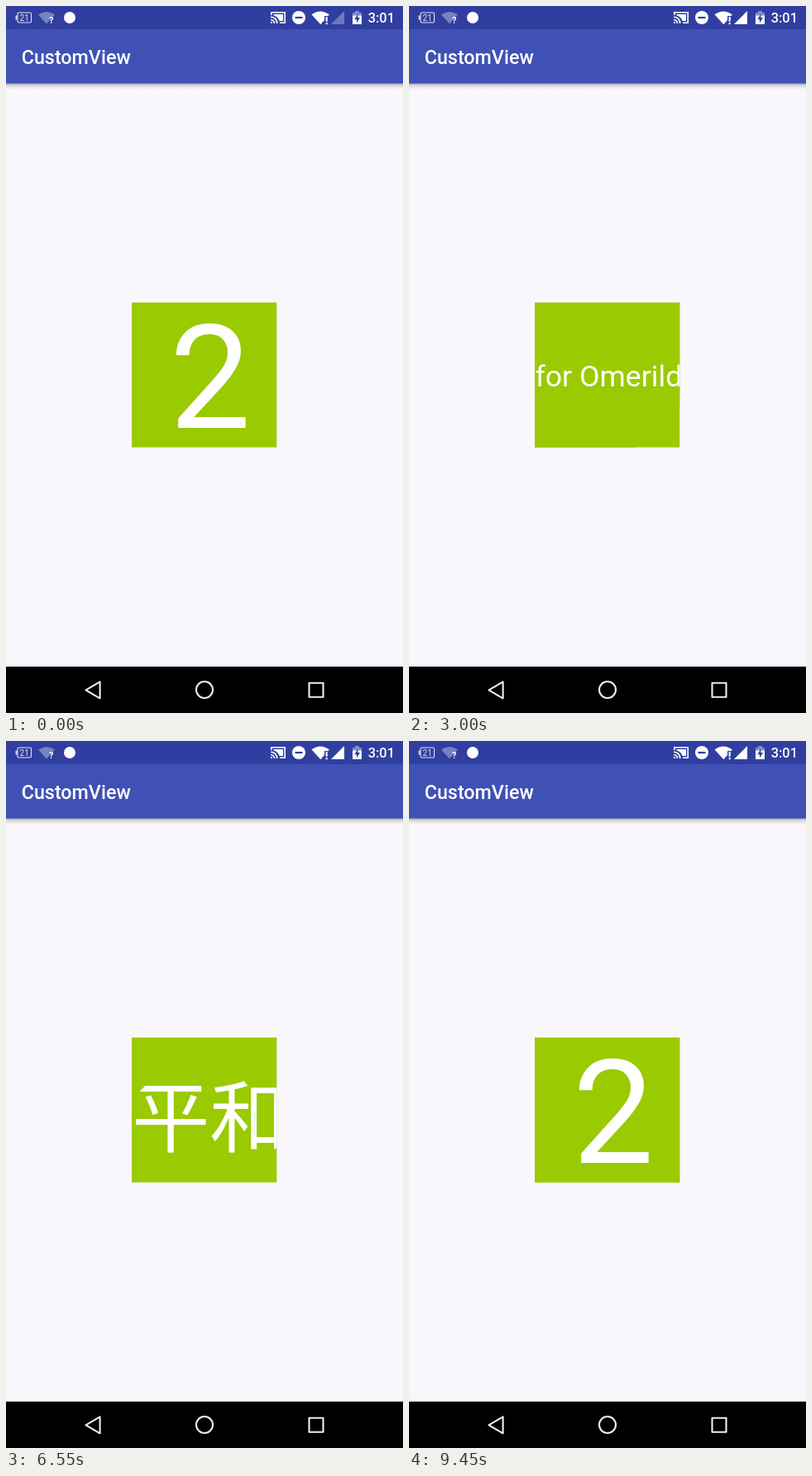
These frames come from a looping animation (480x853 px, 9500 ms). An HTML page:

```html
<!DOCTYPE html>
<html lang="ja">
<head>
<meta charset="utf-8">
<title>CustomView</title>
<style>
  html, body { margin: 0; width: 100%; height: 100%; overflow: hidden; background: #f9f7fb; }
  svg { display: block; }
  #stage { width: 480px; height: 853px; }
  text { font-family: Roboto, "Noto Sans CJK JP", "Noto Sans CJK SC", "Noto Sans CJK", sans-serif; fill: #fff; }
  .medium { font-weight: 500; }
</style>
</head>
<body>
<svg id="stage" viewBox="0 0 480 853" fill="#fff">
  <defs>
    <linearGradient id="shade" x2="0" y2="1">
      <stop offset="0" stop-color="#000" stop-opacity=".32"/>
      <stop offset=".45" stop-color="#000" stop-opacity=".1"/>
      <stop offset="1" stop-color="#000" stop-opacity="0"/>
    </linearGradient>
    <clipPath id="wipe"><polygon id="corner" points="0,0 0,0 0,0"/></clipPath>
  </defs>

  <rect width="480" height="853" fill="#f9f7fb"/>
  <rect y="93" width="480" height="8" fill="url(#shade)"/>
  <rect y="27" width="480" height="66.5" fill="#3f51b5"/>
  <rect width="480" height="28" fill="#303f9f"/>
  <text class="medium" x="18.7" y="70" font-size="23.3">CustomView</text>

  <!-- status bar, left -->
  <g opacity=".85">
    <rect x="14" y="8" width="16.5" height="12" rx="1.5" fill="none" stroke="#fff" stroke-width="1.1"/>
    <rect x="11.6" y="11.5" width="1.8" height="5"/>
    <text x="22.2" y="17.7" font-size="10" text-anchor="middle">21</text>
  </g>
  <path d="M39 10.5Q49 3.500 59 10.5L49 21.500Z" opacity=".35"/>
  <text x="52" y="20.500" font-size="11" font-weight="700">?</text>
  <circle cx="77" cy="14" r="7"/>

  <!-- status bar, right -->
  <g fill="none" stroke="#fff" stroke-width="1.6">
    <path d="M320.800 11V7.800H337.200V20.200H331"/>
    <path d="M320 13.200A7.500 7.500 0 0 1 327.700 21M320 16.500A4.300 4.300 0 0 1 324.400 21"/>
  </g>
  <path d="M323.500 10H335V18H330.500A10.500 10.500 0 0 0 323.500 11.300ZM320 18.800A2.200 2.200 0 0 1 322.200 21H320Z"/>
  <circle cx="354" cy="14" r="8"/>
  <rect x="349.500" y="12.900" width="9" height="2.200" fill="#303f9f"/>
  <path d="M369.500 10.300Q380 2.500 390.800 10.300L389.500 12H385V17L380.300 22.300Z"/>
  <path d="M386.600 13H388.700V18.700H386.600ZM386.600 20H388.700V22.200H386.600Z"/>
  <path id="signal" d="M393 22H409V6Z"/>
  <path d="M419 8H422V6H427V8H430V12H419Z" opacity=".4"/>
  <path d="M419 11.500H430V22H419Z"/>
  <path d="M425.400 9.500L421.300 16.200H424V20.500L428 13.900H425.400Z" fill="#303f9f"/>
  <text class="medium" x="470" y="20.300" font-size="16.400" text-anchor="end">3:01</text>

  <!-- counter view -->
  <svg x="152" y="357.500" width="175.300" height="175" overflow="hidden">
    <rect width="176" height="176" fill="#9aca02"/>
    <text id="back"></text>
    <g clip-path="url(#wipe)">
      <rect width="176" height="176" fill="#9aca02"/>
      <text id="front"></text>
    </g>
  </svg>

  <!-- navigation bar -->
  <rect y="797" width="480" height="56" fill="#000"/>
  <g fill="none" stroke="#eee" stroke-width="2.100" stroke-linejoin="round">
    <path d="M96.500 825.300L113.600 815.300V835.300Z"/>
    <circle cx="240" cy="825" r="10"/>
    <rect x="366.500" y="816.800" width="17" height="17"/>
  </g>
</svg>

<script>
  const LOOP = 9500, STEP = 50, WIPE = 1000, SIDE = 175;
  const words = ["2", "3", "for Omerild", "平和", "1", "2"];
  const starts = [250, 2255, 4300, 6245, 8250];
  const weakSignal = [[0, 2300], [8250, 9400]];
  const $ = id => document.getElementById(id);
  const pen = document.createElement("canvas").getContext("2d");
  const family = getComputedStyle($("back")).fontFamily;

  function bounds(word, size) {
    pen.font = `${size}px ${family}`;
    const m = pen.measureText(word);
    return {
      w: m.actualBoundingBoxLeft + m.actualBoundingBoxRight,
      h: m.actualBoundingBoxAscent + m.actualBoundingBoxDescent
    };
  }

  // Largest size whose ink fits the square; the origin ignores side bearings.
  function layout(word) {
    const size = Math.min(SIDE, 100 * SIDE / bounds(word, 100).w);
    const { w, h } = bounds(word, size);
    return { word, size, x: 87.8 - w / 2, y: 88.2 + h / 2 };
  }

  const faces = words.map(layout);

  function show(el, face) {
    if (el.face === face) return;
    el.face = face;
    el.textContent = face.word;
    el.setAttribute("font-size", face.size);
    el.setAttribute("x", face.x);
    el.setAttribute("y", face.y);
  }

  function render(t) {
    const i = Math.max(0, starts.filter(s => s <= t).length - 1);
    const p = Math.min(1, Math.max(0, (t - starts[i]) / WIPE));
    const reach = SIDE * (1 - Math.cos(Math.PI * p)) * 1.005;
    show($("back"), faces[i]);
    show($("front"), faces[i + 1]);
    $("corner").setAttribute("points", `0,0 ${reach},0 0,${reach}`);
    const weak = weakSignal.some(([a, b]) => t >= a && t < b);
    $("signal").setAttribute("opacity", weak ? 0.3 : 1);
  }

  const origin = performance.now();
  function tick(now) {
    const t = Math.max(0, now - origin) % LOOP;
    render(Math.floor(t / STEP) * STEP);
    requestAnimationFrame(tick);
  }
  render(0);
  requestAnimationFrame(tick);
</script>
</body>
</html>
```
